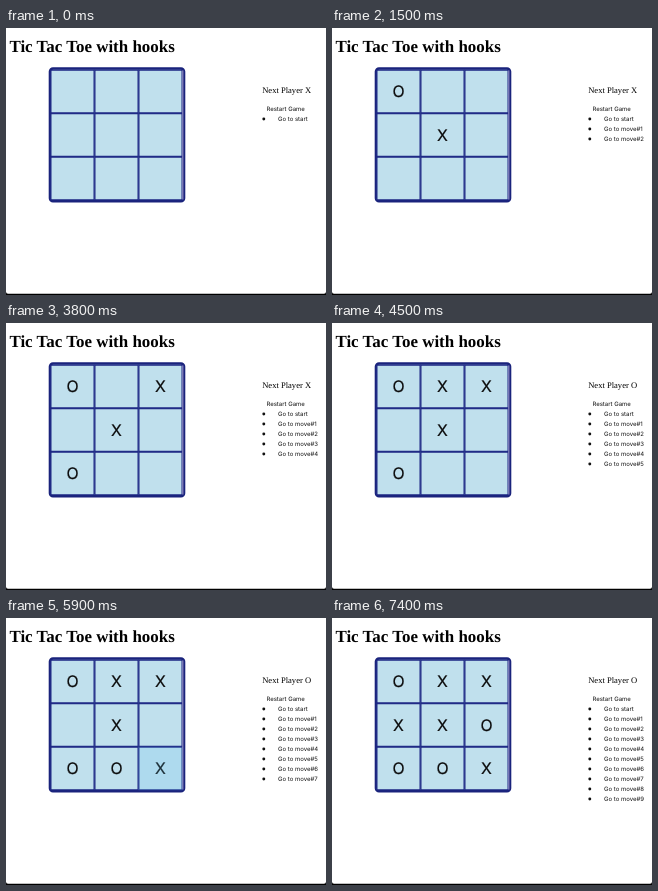
An HTML page for the animation above (8 s loop, 320 px wide and 267 px high).

```html
<!DOCTYPE html>
<html lang="en">
<head>
<meta charset="utf-8">
<title>Tic Tac Toe with hooks</title>
<style>
  html, body { margin: 0; height: 100%; overflow: hidden; background: #000; }
  svg { display: block; width: 100%; height: 100%; text-rendering: geometricPrecision; }
  .serif { font-family: "Liberation Serif", Times, serif; }
  .sans { font-family: Inter, Roboto, sans-serif; }
  .small { font-size: 6px; fill: #111; }
  .mark { font-size: 15.9px; text-anchor: middle; fill: #0b0b0b; stroke: #0b0b0b; stroke-width: .2; }
</style>
</head>
<body>
<svg viewBox="0 0 320 267">
  <rect y="-4" width="320" height="269.7" rx="2" fill="#fff"/>
  <text class="serif" x="3.4" y="23.6" font-size="16.95" font-weight="bold">Tic Tac Toe with hooks</text>
  <rect x="44" y="40.5" width="134" height="132.8" rx="3" fill="#c0e0ed" stroke="#1a237c" stroke-width="2.6"/>
  <g id="cells" fill="#c0e0ed" stroke="#1c2684" stroke-width="1.2"></g>
  <path d="M176.9 42.5V171.5" stroke="#b9a9d6" stroke-width=".8"/>
  <g id="marks" class="sans mark"></g>
  <rect id="tap" width="44" height="43.5" fill="#64c3f0"/>
  <text id="status" class="serif" x="256.2" y="65.2" font-size="8.55"></text>
  <text class="sans small" x="260.4" y="83.2">Restart Game</text>
  <g id="history" class="sans small"></g>
</svg>
<script>
const LOOP = 8000, FRAME = 100;
const LEFT = 44.5, TOP = 41.75, CELL_W = 44, CELL_H = 43.5;

// Each tap: start time, cell index, highlight length in frames.
// The first tap does not register as a move.
const taps = [
  { at: 100, cell: 4, frames: 1, ignored: true },
  { at: 500, cell: 4, frames: 1 },
  { at: 1400, cell: 0, frames: 1 },
  { at: 2600, cell: 2, frames: 1 },
  { at: 3600, cell: 6, frames: 2 },
  { at: 4400, cell: 1, frames: 1 },
  { at: 5100, cell: 7, frames: 2 },
  { at: 5800, cell: 8, frames: 2 },
  { at: 6500, cell: 5, frames: 1 },
  { at: 7200, cell: 3, frames: 2 }
];
const moves = taps.filter(tap => !tap.ignored);

const byId = id => document.getElementById(id);
const cellX = i => LEFT + (i % 3) * CELL_W;
const cellY = i => TOP + Math.floor(i / 3) * CELL_H;

function add(parent, tag, attrs, text = "") {
  const node = document.createElementNS("http://www.w3.org/2000/svg", tag);
  for (const name in attrs) node.setAttribute(name, attrs[name]);
  node.textContent = text;
  parent.append(node);
  return node;
}

for (let i = 0; i < 9; i++) {
  add(byId("cells"), "rect", {
    x: cellX(i) + 0.4, y: cellY(i) + 0.4, width: CELL_W - 0.8, height: CELL_H - 0.8
  });
}

const marks = moves.map(({ cell }, n) => add(byId("marks"), "text", {
  x: cellX(cell) + CELL_W / 2, y: cellY(cell) + CELL_H / 2 + 5.9
}, n % 2 ? "O" : "X"));

const entries = Array.from({ length: moves.length + 1 }, (_, n) => {
  const entry = add(byId("history"), "g", { transform: `translate(0 ${n * 10})` });
  add(entry, "circle", { cx: 257.8, cy: 91, r: 1.45 });
  add(entry, "text", { x: 272, y: 93.4 }, n ? "Go to move#" + n : "Go to start");
  return entry;
});

const show = (node, visible) => node.setAttribute("visibility", visible ? "visible" : "hidden");

function render(time) {
  const count = moves.filter(move => time >= move.at).length;
  marks.forEach((mark, n) => show(mark, n < count));
  entries.forEach((entry, n) => show(entry, n <= count));
  byId("status").textContent = "Next Player " + (count % 2 ? "O" : "X");

  const tap = taps.find(t => time >= t.at && time < t.at + t.frames * FRAME);
  show(byId("tap"), tap);
  if (tap) {
    const step = Math.floor((time - tap.at) / FRAME);
    byId("tap").setAttribute("x", cellX(tap.cell));
    byId("tap").setAttribute("y", cellY(tap.cell));
    byId("tap").setAttribute("opacity", step ? 0.2 : 0.4);
  }
}

const start = performance.now();
function tick() {
  render((performance.now() - start) % LOOP);
  requestAnimationFrame(tick);
}
tick();
</script>
</body>
</html>
```
